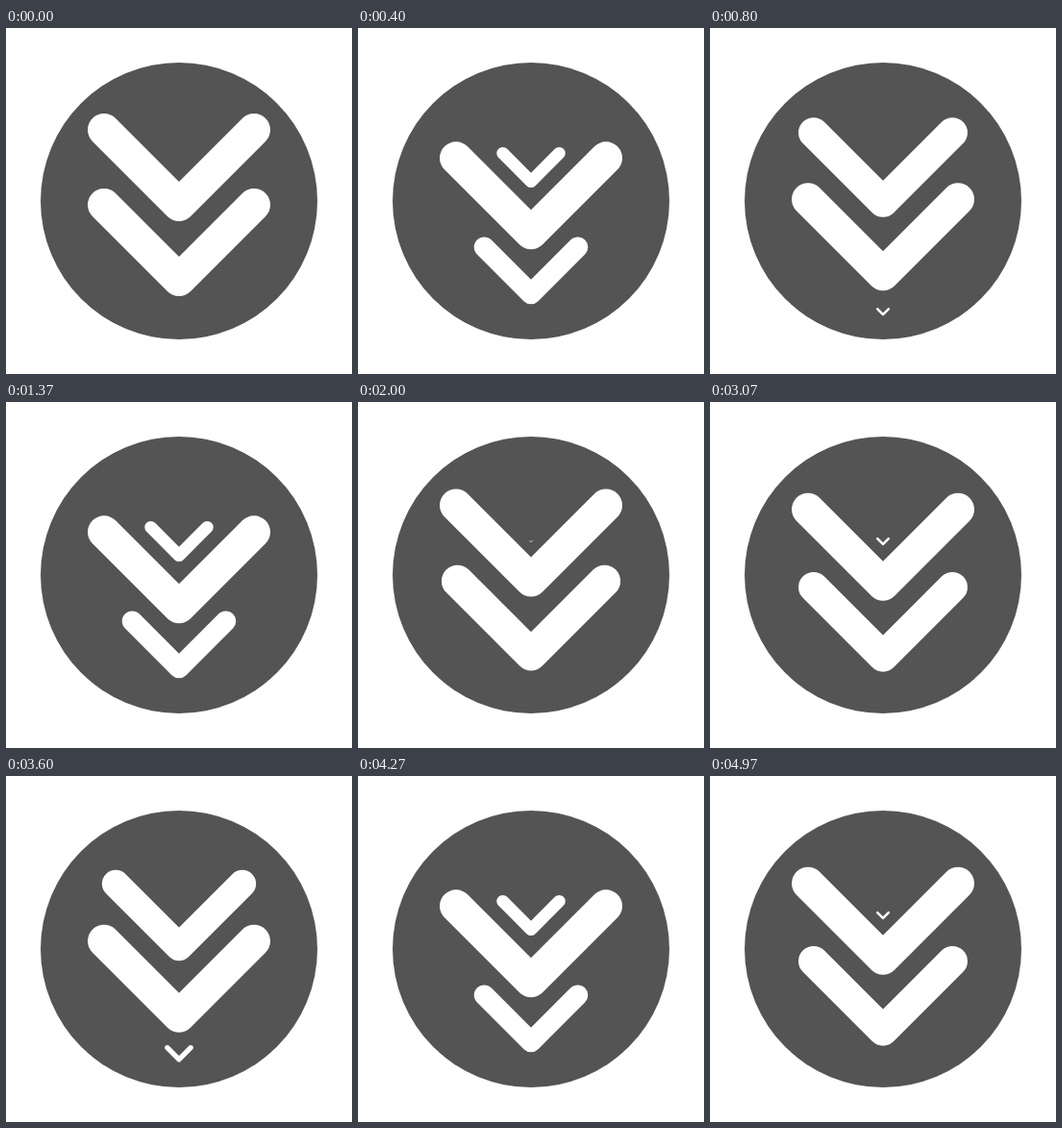
These frames come from a looping animation (360 px wide and 360 px high, 5.07 s). An HTML page:

```html
<!DOCTYPE html>
<html lang="en">
<head>
<meta charset="utf-8">
<title>Scroll down</title>
<style>
  html, body { margin: 0; height: 100%; overflow: hidden; background: #fff; }
  svg { display: block; width: 100%; height: 100%; }
  path { fill: none; stroke: #fff; stroke-width: 34; stroke-linecap: round; stroke-linejoin: round; }
</style>
</head>
<body>
<svg viewBox="0 0 360 360">
  <circle cx="180" cy="180" r="144" fill="#545454"/>
  <path d="M-78-39 0 39 78-39"/>
  <path d="M-78-39 0 39 78-39"/>
  <path d="M-78-39 0 39 78-39"/>
</svg>
<script>
  const LOOP = 5070, STEPS_PER_CYCLE = 12, TOP = 145, TRAVEL = 78;
  const [growing, moving, shrinking] = document.querySelectorAll('path');

  const place = (chevron, y, scale) =>
    chevron.setAttribute('transform', `translate(180 ${y}) scale(${scale})`);

  // 12.5 poses per second, shown on a 30 Hz clock
  function progress(time) {
    const tick = Math.floor(time * 3 / 100);
    const step = Math.floor(tick * 5 / 12);
    const x = step % STEPS_PER_CYCLE / STEPS_PER_CYCLE;
    return x * x * (3 - 2 * x);
  }

  function draw() {
    const p = progress(performance.now() % LOOP);
    place(growing, TOP, p);
    place(moving, TOP + TRAVEL * p, 1);
    place(shrinking, TOP + TRAVEL * (1 + p), 1 - p);
    requestAnimationFrame(draw);
  }
  draw();
</script>
</body>
</html>
```
